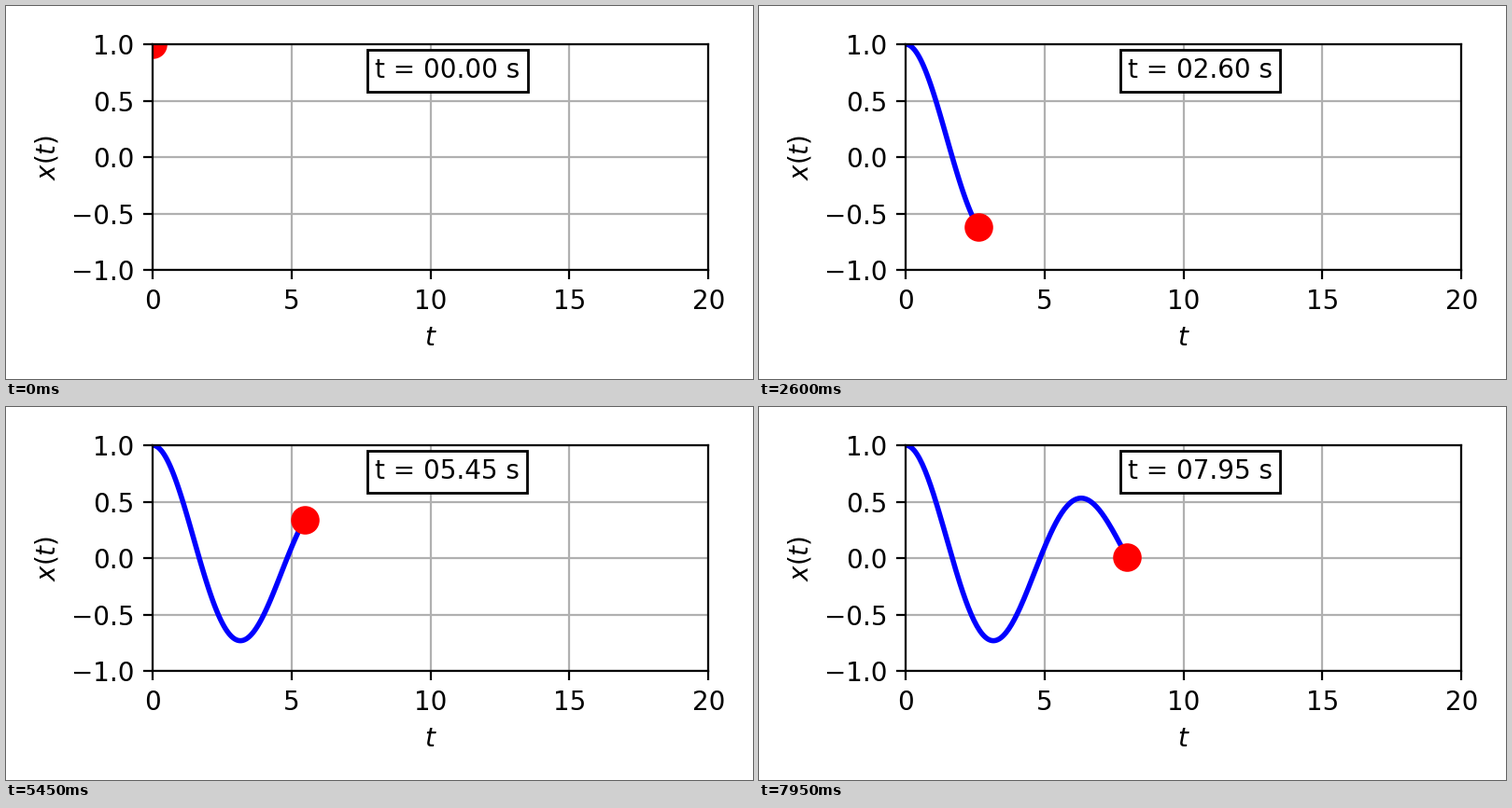
Write a matplotlib script that moves like this. It is 800x400 px and loops after 8 s.

```python
import numpy as np
import matplotlib.pyplot as plt
from matplotlib.animation import FuncAnimation

plt.rcParams["font.family"] = "DejaVu Sans"

FRAMES, INTERVAL = 160, 50
DAMPING = 0.1

# Damped oscillator released from rest at x = 1
t = np.linspace(0, 20, 400)
omega = np.sqrt(1 - DAMPING**2)
x = np.exp(-DAMPING * t) * (np.cos(omega * t) + DAMPING / omega * np.sin(omega * t))

fig, ax = plt.subplots(figsize=(4, 2), dpi=200)
ax.set(xlim=(0, 20), ylim=(-1, 1), xlabel="$t$", ylabel="$x(t)$",
       xticks=np.arange(0, 21, 5), yticks=np.linspace(-1, 1, 5))
ax.grid(True)
fig.tight_layout()

trail, = ax.plot([], [], "b-", lw=2)
ball, = ax.plot([], [], "ro", ms=10)
clock = ax.text(0.4, 0.85, "", transform=ax.transAxes,
                bbox=dict(boxstyle="square,pad=0.3", fc="white", ec="black", lw=1))


def update(i):
    trail.set_data(t[:i + 1], x[:i + 1])
    ball.set_data([t[i]], [x[i]])
    clock.set_text(f"t = {i * INTERVAL / 1000:05.2f} s")
    return trail, ball, clock


anim = FuncAnimation(fig, update, frames=FRAMES, interval=INTERVAL,
                     init_func=lambda: update(0), repeat=True, repeat_delay=0)
plt.show()
```
